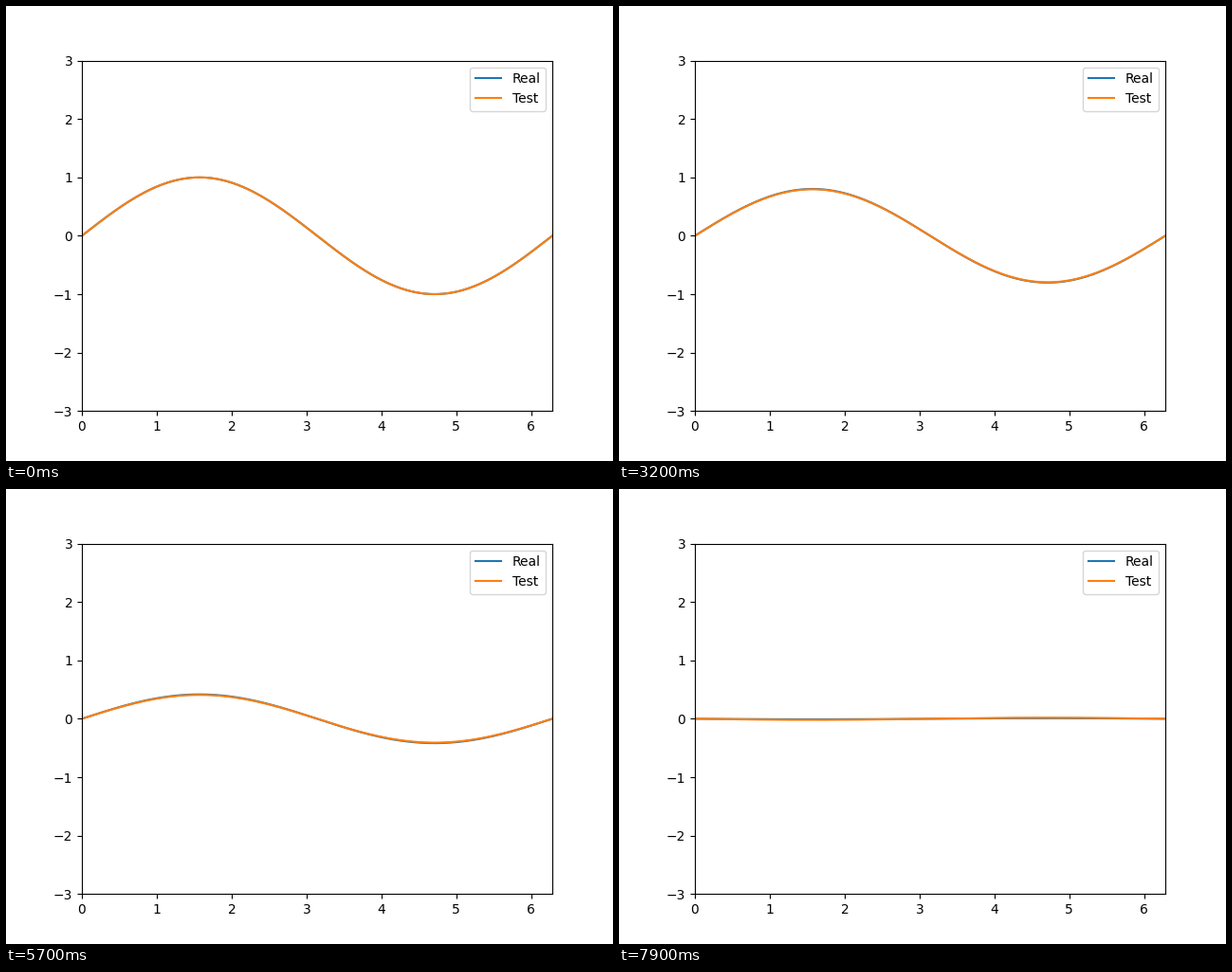
Recreate the animation shown at these times as a matplotlib script. Size 640 px wide and 480 px high, loop 8 s.

```python
import numpy as np
import matplotlib.pyplot as plt
from matplotlib.animation import FuncAnimation

FRAMES = 80
INTERVAL = 100
DT = 0.02

x = np.linspace(0, 2 * np.pi, 200)
mode = np.sin(x)

fig, ax = plt.subplots(figsize=(6.4, 4.8), dpi=100)
ax.set_xlim(0, 2 * np.pi)
ax.set_ylim(-3, 3)
real, = ax.plot(x, mode, label="Real")
test, = ax.plot(x, mode, label="Test")
ax.legend(loc="upper right")


def stepped(n):
    """Amplitude of the standing wave after n semi-implicit Euler steps."""
    u, v = 1.0, 0.0
    for _ in range(n):
        v -= u * DT
        u += v * DT
    return u


def update(n):
    real.set_ydata(np.cos(n * DT) * mode)
    test.set_ydata(stepped(n) * mode)
    return real, test


anim = FuncAnimation(fig, update, frames=FRAMES, interval=INTERVAL,
                     init_func=lambda: update(0), repeat=True, repeat_delay=0)
plt.show()
```
